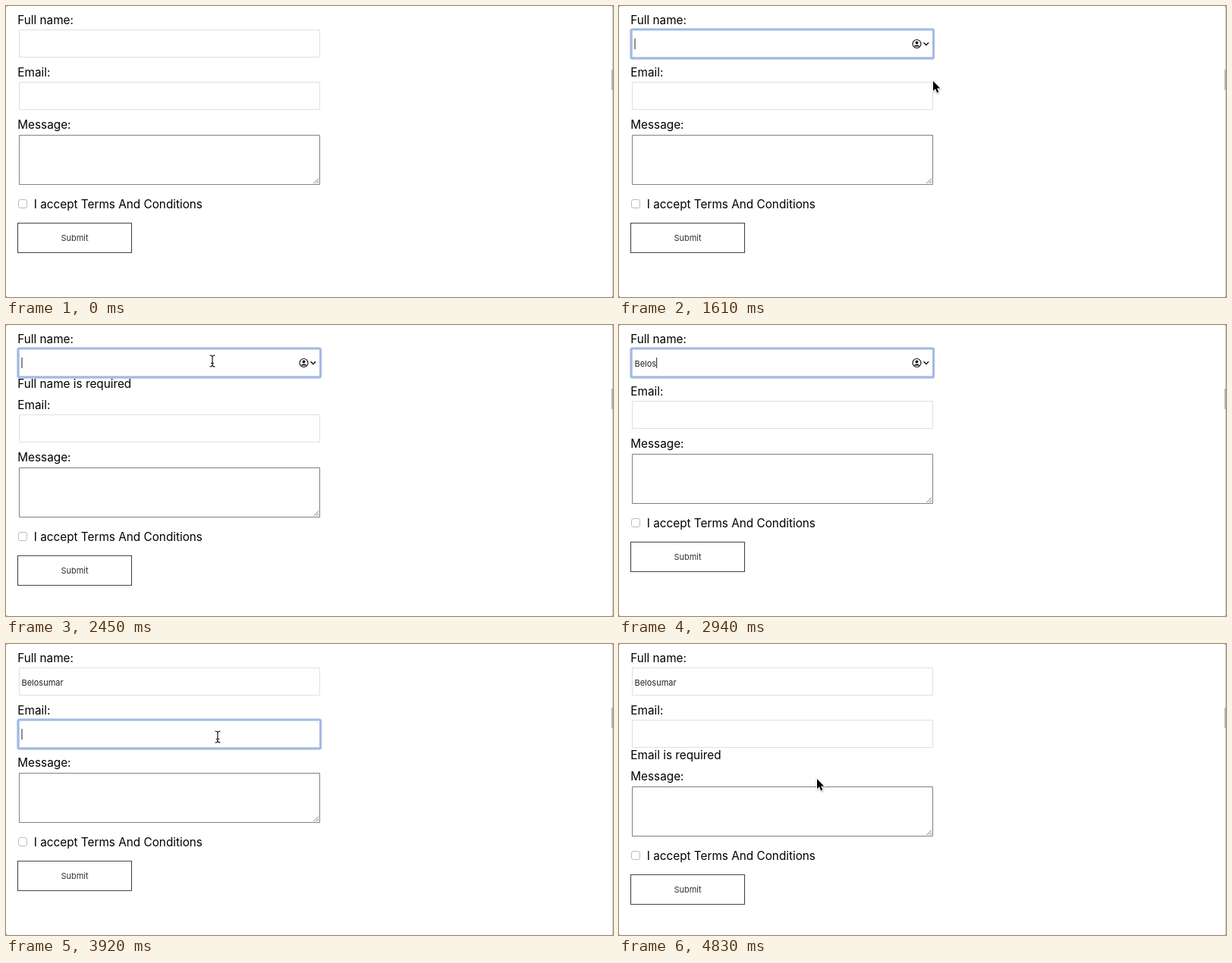
An HTML page with a canvas that plays this animation: 800 by 384 pixels, repeating every 4.9 s.

```html
<!DOCTYPE html>
<html lang="en">
<head>
<meta charset="utf-8">
<title>Form validation</title>
<style>
  html, body { margin: 0; width: 100%; height: 100%; overflow: hidden; background: #fff; }
  canvas { display: block; width: 800px; height: 384px; }
</style>
</head>
<body>
<canvas id="stage" width="800" height="384"></canvas>
<script>
const ctx = document.getElementById('stage').getContext('2d');
const LOOP = 4900, STEP = 70, ERROR_HEIGHT = 18;
const LABEL = '15.3px Inter, "Open Sans", sans-serif';
const SMALL = '11px Inter, "Open Sans", sans-serif';
const NAME = 'Belosumar';
const KEY_TIMES = [2520, 2590, 2730, 2870, 2940, 3010, 3080, 3220, 3290];

// Pointer tracks: [time, x, y, shape]; the last position holds until `end`.
const TRACKS = [
  { end: 2520, keys: [
    [70, 374, 368, 'arrow'], [210, 326, 268, 'arrow'], [350, 266, 166, 'arrow'],
    [490, 215, 88, 'arrow'], [630, 184, 54, 'arrow'], [700, 173, 48, 'arrow'],
    [770, 164, 48, 'beam'], [840, 161, 49, 'beam'], [1330, 161, 49, 'beam'],
    [1400, 196, 51, 'beam'], [1470, 290, 59, 'beam'], [1540, 380, 84, 'arrow'],
    [1610, 413, 98, 'arrow'], [1680, 423, 101, 'arrow'], [1820, 412, 97, 'arrow'],
    [1890, 412, 97, 'arrow'], [1960, 396, 85, 'arrow'], [2030, 356, 62, 'beam'],
    [2100, 314, 49, 'beam'], [2170, 286, 46, 'beam'], [2310, 272, 47, 'beam'] ] },
  { end: LOOP, keys: [
    [3570, 272, 52, 'beam'], [3640, 274, 74, 'arrow'], [3710, 277, 103, 'beam'],
    [3780, 279, 119, 'beam'], [3850, 279, 122, 'beam'], [3920, 279, 122, 'beam'],
    [3990, 334, 126, 'beam'], [4060, 424, 128, 'arrow'], [4130, 484, 124, 'arrow'],
    [4200, 510, 120, 'arrow'], [4340, 498, 118, 'arrow'], [4480, 498, 118, 'arrow'],
    [4550, 462, 124, 'arrow'], [4620, 394, 143, 'arrow'], [4690, 324, 162, 'arrow'],
    [4760, 276, 174, 'arrow'], [4830, 260, 177, 'arrow'] ] }
];

const within = (t, from, to) => t >= from && t < to;

function text(str, x, y, font = LABEL, color = '#000') {
  ctx.font = font;
  ctx.fillStyle = color;
  ctx.fillText(str, x, y);
}

function box(x, y, w, h, color, radius = 0, width = 1) {
  ctx.strokeStyle = color;
  ctx.lineWidth = width;
  ctx.beginPath();
  ctx.roundRect(x, y, w, h, radius);
  ctx.stroke();
}

function line(points, color, width) {
  ctx.strokeStyle = color;
  ctx.lineWidth = width;
  ctx.beginPath();
  points.forEach(([x, y], i) => i ? ctx.lineTo(x, y) : ctx.moveTo(x, y));
  ctx.stroke();
}

function input(y, value, focused, caretOn) {
  box(17.5, y + 0.5, 396, 36, '#e0e0e0');
  if (focused) {
    box(16, y, 398.5, 38, '#a2bbe5', 1.5, 3);
    box(14.7, y - 1.3, 401, 40.6, 'rgba(162,187,229,.4)', 3, 0.8);
  }
  text(value, 20.5, y + 23.5, SMALL, '#222');
  if (focused && caretOn) {
    const x = 21 + (value ? ctx.measureText(value).width : 0);
    ctx.fillStyle = '#222';
    ctx.fillRect(x - 0.5, y + 12, 1, 14);
  }
}

function autofillIcon(x, y) {
  ctx.strokeStyle = ctx.fillStyle = '#111';
  ctx.lineWidth = 1.2;
  ctx.beginPath();
  ctx.arc(x, y, 5.5, 0, Math.PI * 2);
  ctx.stroke();
  ctx.beginPath();
  ctx.arc(x, y - 1.5, 1.9, 0, Math.PI * 2);
  ctx.fill();
  ctx.beginPath();
  ctx.ellipse(x, y + 3.4, 3.5, 2, 0, Math.PI, 0);
  ctx.fill();
  line([[x + 9, y - 1.8], [x + 12.3, y + 1.5], [x + 15.6, y - 1.8]], '#111', 1.4);
}

function form(t) {
  const nameError = within(t, 1750, 2520);
  const emailError = t >= 4340;
  const firstFocus = within(t, 1190, 1750), secondFocus = within(t, 2380, 3850);
  const nameFocus = firstFocus || secondFocus;
  const emailFocus = within(t, 3850, 4340);
  const typed = KEY_TIMES.filter(k => k <= t);
  const caretStart = emailFocus ? 3850 : secondFocus ? typed.at(-1) || 2380 : 1190;
  const caretOn = (t - caretStart) % 1000 < 500;

  text('Full name:', 15.3, 24);
  input(31, NAME.slice(0, typed.length), nameFocus, caretOn);
  if (within(t, 1260, 1750) || within(t, 2450, 3850)) autofillIcon(392.5, 50);

  let shift = 0;
  if (nameError) {
    text('Full name is required', 15.3, 83);
    shift += ERROR_HEIGHT;
  }
  text('Email:', 15.3, 93 + shift);
  input(100 + shift, '', emailFocus, caretOn);
  if (emailError) {
    text('Email is required', 15.3, 152 + shift);
    shift += ERROR_HEIGHT;
  }

  ctx.save();
  ctx.translate(0, shift);
  text('Message:', 15.3, 162);
  box(17.5, 170.5, 396, 65, '#808080');
  line([[405.5, 234], [412, 227.5]], '#777', 1);
  line([[409, 234], [412, 231]], '#777', 1);
  box(16.5, 255.5, 11, 11, '#bdbdbd', 2.5);
  text('I accept Terms And Conditions', 36.8, 267);
  box(15.5, 286.5, 150, 39, '#444', 0, 1.1);
  ctx.textAlign = 'center';
  text('Submit', 90.5, 310, SMALL, '#333');
  ctx.textAlign = 'left';
  ctx.restore();
}

function pointerAt(t) {
  const track = TRACKS.find(({ keys, end }) => within(t, keys[0][0], end));
  if (!track) return null;
  const i = track.keys.findLastIndex(k => k[0] <= t);
  const a = track.keys[i], b = track.keys[i + 1] || a;
  const p = b === a ? 0 : (t - a[0]) / (b[0] - a[0]);
  return { x: a[1] + (b[1] - a[1]) * p, y: a[2] + (b[2] - a[2]) * p, shape: a[3] };
}

function arrow() {
  const outline = new Path2D('M1 1V14L4 11.2 6.2 16.4 8.4 15.4 6.2 10.4H10.2Z');
  ctx.save();
  ctx.shadowColor = 'rgba(0,0,0,.3)';
  ctx.shadowBlur = 2;
  ctx.shadowOffsetY = 1;
  ctx.strokeStyle = '#fff';
  ctx.lineWidth = 2;
  ctx.stroke(outline);
  ctx.restore();
  ctx.fillStyle = '#000';
  ctx.fill(outline);
}

function beam() {
  const shape = new Path2D('M-3.5-7Q0-7 0-4.5Q0-7 3.5-7M0-5V6M-3.5 8Q0 8 0 5.5Q0 8 3.5 8M-2 3.5H2');
  for (const [color, width] of [['#fff', 2.8], ['#111', 1.2]]) {
    ctx.strokeStyle = color;
    ctx.lineWidth = width;
    ctx.stroke(shape);
  }
}

function windowEdge() {
  ctx.fillStyle = '#ccc';
  ctx.fillRect(799, 0, 1, 384);
  ctx.fillStyle = '#b5b5b5';
  ctx.fillRect(798, 84, 2, 27);
  ctx.fillStyle = '#777';
  for (const [x, y] of [[0, 0], [799, 0], [0, 383], [799, 383]]) ctx.fillRect(x, y, 1, 1);
}

function draw(now) {
  const t = Math.floor((now % LOOP) / STEP) * STEP;
  ctx.fillStyle = '#fff';
  ctx.fillRect(0, 0, 800, 384);
  windowEdge();
  form(t);
  const pointer = pointerAt(t);
  if (pointer) {
    ctx.save();
    ctx.translate(pointer.x, pointer.y);
    pointer.shape === 'arrow' ? arrow() : beam();
    ctx.restore();
  }
}

const start = performance.now();
function tick() {
  draw(performance.now() - start);
  requestAnimationFrame(tick);
}
tick();
</script>
</body>
</html>
```
